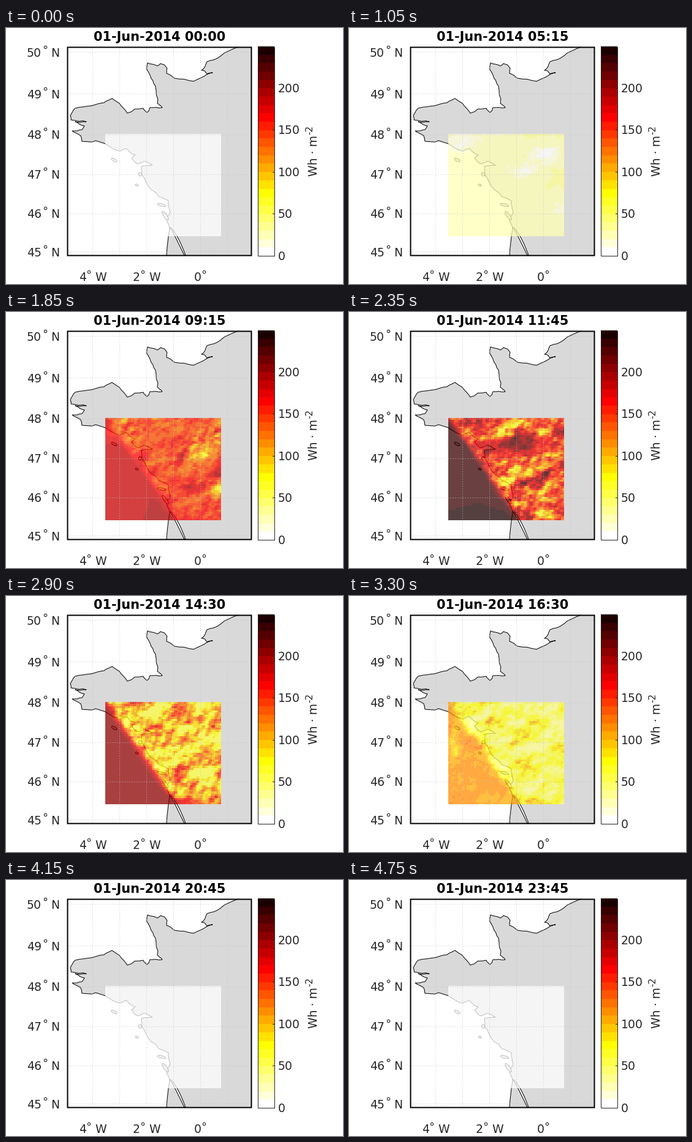
A matplotlib script for the animation above (4.8 s loop, 550 by 418 pixels).

```python
import numpy as np
import matplotlib.pyplot as plt
from matplotlib.animation import FuncAnimation
from matplotlib.colors import ListedColormap
from matplotlib.patches import Ellipse, Polygon, Rectangle

W, H, DPI = 550, 418, 100
FRAMES, INTERVAL = 96, 50
LEFT, RIGHT, TOP, BOTTOM = 100.5, 400.5, 31.5, 371.5
X0, X1, Y0, Y1 = 162, 351, 173, 340      # data window
COLS, ROWS = 76, 48
DEGREE = 44                              # pixels per degree of longitude
PX = 72 / DPI
SIZE = 13.64
INK, LAND = "#262626", "#d9d9d9"

plt.rcParams["font.family"] = "DejaVu Sans"
fig = plt.figure(figsize=(W / DPI, H / DPI), dpi=DPI, facecolor="white")
ax = fig.add_axes([0, 0, 1, 1])
ax.axis("off")


def put(x, y, s, size=SIZE, color=INK, **kw):
    return ax.text(x, y, s, fontsize=size, color=color, va="baseline",
                   rotation_mode="anchor", **kw)


def ring(x, y):
    ax.plot(x, y, "o", ms=4.4 * PX, mfc="none", mec=INK, mew=1.1 * PX)


def hot_reversed(m):
    n = 3 * m // 8
    k = np.arange(1, m + 1)
    rgb = [k / n, (k - n) / n, (k - 2 * n) / (m - 2 * n)]
    return ListedColormap(np.clip(np.transpose(rgb), 0, 1)[::-1])


def lat_y(lat):
    """Mercator row of a latitude, with 48 N at the window's top."""
    m = np.degrees(np.arcsinh(np.tan(np.radians([48, lat]))))
    return Y0 + .5 + DEGREE * (m[0] - m[1])


def roughen(points, rng, rounds=2, amount=.06):
    """Bend each segment a little sideways at its middle."""
    p = np.array(points, float)
    for _ in range(rounds):
        step = np.diff(p, axis=0)
        side = step[:, ::-1] * [-1, 1]
        mid = p[:-1] + step / 2 + side * rng.normal(0, amount, (len(step), 1))
        out = np.empty((2 * len(p) - 1, 2))
        out[::2], out[1::2] = p, mid
        p = out
    return p


CMAP = hot_reversed(25)
rng = np.random.default_rng(14)

# Land, estuary and islands
coast = roughen([
    (379, 31), (350, 46), (328, 55), (319, 69), (328, 75), (337, 73),
    (323, 79), (306, 87), (275, 82), (262, 74), (263, 66), (252, 58),
    (247, 62), (231, 57), (235, 77), (244, 95), (247, 123), (255, 130),
    (235, 130), (230, 138), (224, 131), (198, 139), (185, 123), (173, 115),
    (160, 122), (139, 127), (113, 131), (105, 143), (106, 150), (131, 153),
    (113, 153), (128, 160), (124, 166), (108, 168), (122, 176), (124, 185),
    (146, 184), (162, 189), (186, 201), (197, 197), (211, 207), (205, 212),
    (215, 222), (224, 218), (239, 224), (221, 226), (222, 240), (237, 264),
    (265, 282), (268, 300), (262, 315), (267, 328), (262, 371)], rng)
ax.add_patch(Polygon([*coast, (RIGHT, BOTTOM), (RIGHT, TOP)], fc=LAND, lw=0))
ax.plot(*coast.T, color="black", lw=PX, zorder=2)

s = np.linspace(0, 1, 12)
mid_x, mid_y = 268 + 24 * s ** .8, 326 + 45 * s
half = 1 + .8 * np.sin(np.pi * s)
bank = np.r_[np.c_[mid_x - half, mid_y], np.c_[mid_x + half, mid_y][::-1]]
ax.add_patch(Polygon(bank, fc="white", ec="black", lw=PX, zorder=2))

for x, y, w, h, tilt in [(176.5, 215.5, 10, 4, 30), (219, 239, 6, 5, 60),
                         (213.5, 256.5, 5, 3, 20), (254, 289, 14, 4, 15),
                         (260, 306.5, 17, 5, 55)]:
    ax.add_patch(Ellipse((x, y), w, h, angle=tilt, fc=LAND, ec="black",
                         lw=PX, zorder=2))

# Graticule and frame
dots = dict(color="#c2c2c2", lw=PX, ls=(0, (1, 3)), zorder=5)
for lon in range(-4, 2):
    x = 316.5 + DEGREE * lon
    ax.plot([x, x], [TOP, BOTTOM], **dots)
    if lon in (-4, -2, 0):
        left = x - (21.5 if lon else 9.5)
        put(left, 413, str(-lon))
        ring(left + 16, 398)
        put(left + 26, 413, "W" if lon else "")
for lat in range(45, 51):
    y = lat_y(lat)
    ax.plot([LEFT, RIGHT], [y, y], **dots)
    put(34, y + 7.5, str(lat))
    ring(63.5, y - 8.5)
    put(87, y + 7.5, "N", ha="right")
ax.add_patch(Rectangle((LEFT, TOP), RIGHT - LEFT, BOTTOM - TOP, fc="none",
                       ec="black", lw=2 * PX, zorder=6, snap=False))

# Colour scale
BAR = (411, 437.5, 372, 30.5)
ax.imshow(np.arange(24, -1, -1)[:, None], cmap=CMAP, vmin=0, vmax=24,
          extent=BAR, aspect="auto", interpolation="nearest")
ax.add_patch(Rectangle((BAR[0], BAR[3]), BAR[1] - BAR[0], BAR[2] - BAR[3],
                       fc="none", ec=INK, lw=PX, zorder=6))
for v in range(0, 201, 50):
    y = 372 - 1.372 * v
    ax.plot([BAR[1] - 3, BAR[1]], [y, y], color=INK, lw=PX, zorder=6)
    put(444, y + 7, str(v))
put(508, 242, "Wh · m", rotation=90)
put(500, 174.5, "-2", size=11, rotation=90)

# Irradiance: clear sky dimmed by drifting clouds
GX, GY = np.meshgrid(X0 + (np.arange(COLS) + .5) * (X1 - X0) / COLS,
                     Y0 + (np.arange(ROWS) + .5) * (Y1 - Y0) / ROWS)
LON = (GX - 316) / DEGREE
LAT = np.radians(48 - (GY - Y0) / 64.5)
INLAND = 1 / (1 + np.exp(-(GX - 172 - .7 * (GY - 185)) / 3))
DRIFT = 4                                # pixels per hour
SLANT = .35                              # streaks rise to the east

WAVES = 50
length = np.geomspace(7, 70, WAVES)
angle = rng.normal(np.pi / 2 - SLANT, .6, WAVES)
phase = rng.uniform(0, 2 * np.pi, WAVES)
speed = rng.normal(0, .8, WAVES)
KX = 2 * np.pi / length * np.cos(angle)
KY = 2 * np.pi / length * np.sin(angle)
AMP = length ** .35
AMP /= np.sqrt((AMP ** 2).sum() / 2)


def texture(hour):
    x = GX - DRIFT * hour
    return sum(a * np.sin(kx * x + ky * GY + p + v * hour)
               for a, kx, ky, p, v in zip(AMP, KX, KY, phase, speed))


def bump(x, y, rx, ry, slant=0.0):
    dx = GX - x
    dy = GY - y + slant * dx
    return np.exp(-(dx / rx) ** 2 - (dy / ry) ** 2)


def near(hour, peak, width):
    return max(0, 1 - abs(hour - peak) / width)


def clouds(hour):
    shift = DRIFT * (hour - 7)
    dawn = np.interp(hour, [7, 10.5], [1, 0])
    dusk = np.interp(hour, [14.5, 18.5], [0, 1])
    morning = (.5 * bump(205 + shift, 182, 55, 16, SLANT)
               + .62 * bump(318 + shift, 214, 48, 23, SLANT)
               + .45 * bump(345, 290, 14, 22))
    noon = .15 * bump(255, 283, 20, 20) - .28 * bump(270, 217, 60, 13)
    afternoon = -.35 * bump(300, 335, 35, 14) - .25 * bump(280, 190, 35, 8, .6)
    evening = (.28 + .35 * bump(337, 185, 25, 22)
               + .25 * bump(172, 245, 8, 40, SLANT))
    inland = np.interp(hour, [7, 11.75, 14.5, 18.5], [.03, .4, .55, .22])
    cover = (inland * INLAND + dawn * morning + near(hour, 11.75, 2.5) * noon
             + near(hour, 14.5, 2.5) * afternoon + dusk * evening)
    cover = np.clip(cover, 0, 1)
    gate = np.clip(2.5 * cover - .12, 0, 1) * (1 - .5 * dusk)
    return np.clip(cover + .17 * gate * texture(hour), 0, .72)


def irradiance(hour):
    dec = np.radians(22)
    sun = np.radians(15 * (hour - 12) + LON + .5)
    mu = np.sin(LAT) * np.sin(dec) + np.cos(LAT) * np.cos(dec) * np.cos(sun)
    return 267 * np.clip(mu, 0, 1) ** 1.15 * (1 - clouds(hour))


layer = ax.imshow(np.zeros((ROWS, COLS)), cmap=CMAP, vmin=0, vmax=250,
                  alpha=.75, extent=(X0, X1, Y1, Y0), aspect="auto",
                  interpolation="nearest", zorder=3)
title = put(250.5, 21, "", size=15.05, color="black", weight="bold",
            ha="center")
ax.set_xlim(0, W)
ax.set_ylim(H, 0)


def draw(i):
    layer.set_data(irradiance(i / 4))
    title.set_text(f"01-Jun-2014 {i // 4:02d}:{i % 4 * 15:02d}")
    return layer, title


anim = FuncAnimation(fig, draw, frames=FRAMES, interval=INTERVAL,
                     repeat=True, repeat_delay=0, blit=False)
plt.show()
```
